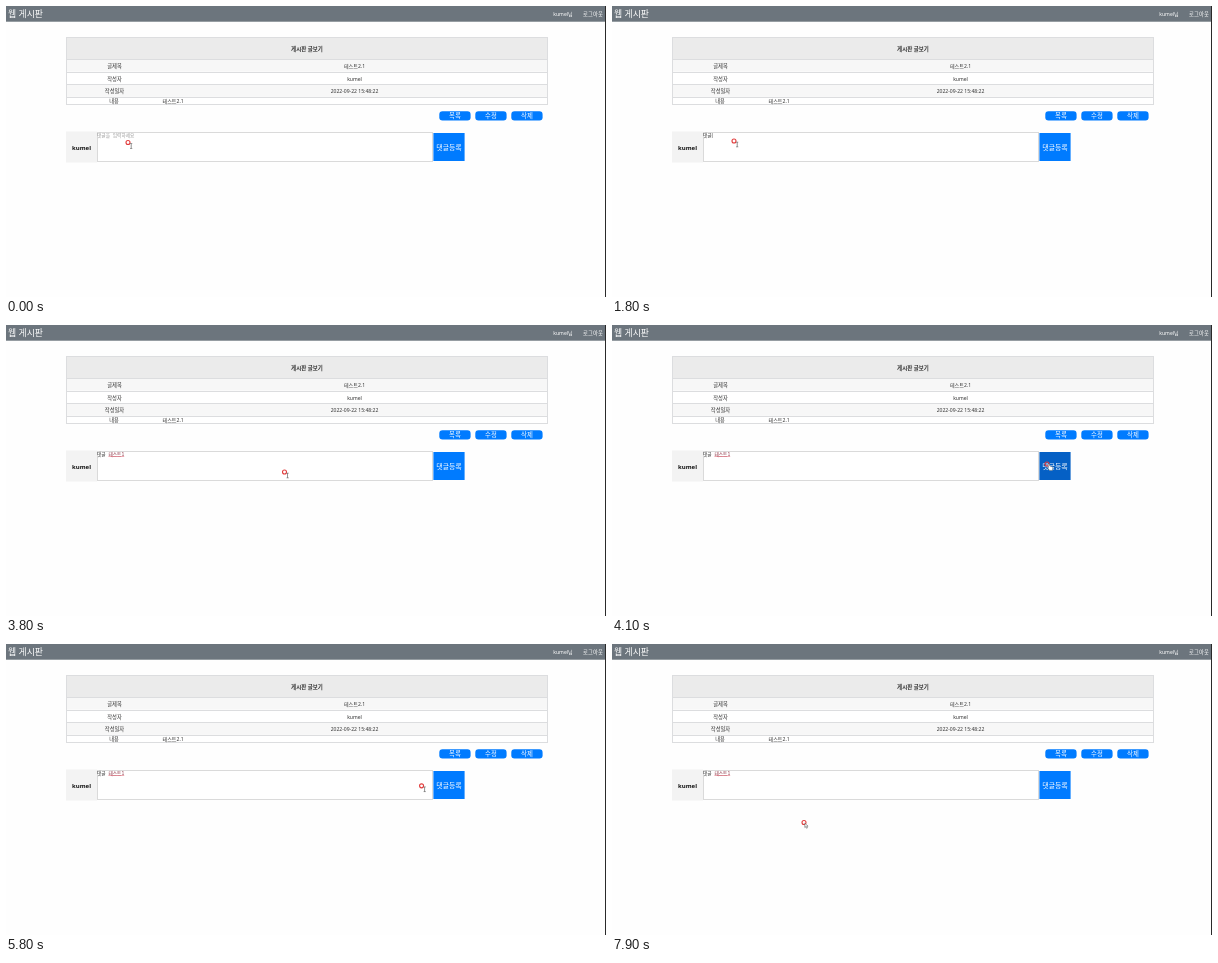
Recreate the animation shown at these times as an HTML page with a canvas. Size 600 px wide and 291 px high, loop 8 s.

```html
<!DOCTYPE html>
<html lang="ko">
<head>
<meta charset="utf-8">
<title>웹 게시판</title>
<style>
  html, body { margin: 0; width: 100%; height: 100%; overflow: hidden; background: #fefefe; }
  canvas { display: block; width: 600px; height: 291px; }
</style>
</head>
<body>
<canvas id="stage"></canvas>
<script>
const canvas = document.getElementById('stage');
const ctx = canvas.getContext('2d');
const ratio = window.devicePixelRatio || 1;
canvas.width = 600 * ratio;
canvas.height = 291 * ratio;

const LOOP = 8000, STEP = 100;
const SANS = '"Noto Sans", "Noto Sans CJK KR", sans-serif';
const MONO = '"Noto Sans Mono", "Noto Sans CJK KR", monospace';
const USER = 'kumel';
const BLUE = '#007bff';
const LEADS = 'ㄱㄲㄴㄷㄸㄹㅁㅂㅃㅅㅆㅇㅈㅉㅊㅋㅌㅍㅎ';

const typing = [
  { at: 1000, gap: 160, word: '댓글 ' },
  { at: 2300, gap: 130, word: '테스트1' }
];
const TYPED = 3600;
const PRESS = 4500;

const moves = [
  { from: 3500, to: 4100, x: 435, y: 139, sag: 10 },
  { from: 5700, to: 6000, x: 360, y: 150, sag: 0 },
  { from: 6200, to: 6600, x: 202, y: 178, sag: 0 },
  { from: 6700, to: 6800, x: 193, y: 175, sag: 0 },
  { from: 7600, to: 7900, x: 192, y: 178.5, sag: 0 }
];

const clamp = v => Math.min(1, Math.max(0, v));
const smooth = k => k * k * (3 - 2 * k);

function ringAt(t) {
  let x = 122, y = 136.5 - 1.5 * clamp(t / 700);
  for (const m of moves) {
    const k = smooth(clamp((t - m.from) / (m.to - m.from)));
    x += (m.x - x) * k;
    y += (m.y - y) * k + m.sag * Math.sin(Math.PI * k);
  }
  return [x, y];
}

// States of a word as its letters are composed key by key
function keystrokes(word) {
  const states = [];
  let done = '';
  for (const ch of word) {
    const code = ch.charCodeAt(0) - 0xac00;
    if (code >= 0) {
      states.push(done + LEADS[Math.floor(code / 588)]);
      if (code % 28) states.push(done + String.fromCharCode(0xac00 + code - code % 28));
    }
    done += ch;
    states.push(done);
  }
  return states;
}

function typedAt(t) {
  return typing.filter(w => t >= w.at).map(w => {
    const states = keystrokes(w.word);
    return states[Math.min(states.length - 1, Math.floor((t - w.at) / w.gap))];
  });
}

function rect(x, y, w, h, color) {
  ctx.fillStyle = color;
  ctx.fillRect(x, y, w, h);
}

function frame(x, y, w, h, color) {
  ctx.strokeStyle = color;
  ctx.lineWidth = 1;
  ctx.strokeRect(x + 0.5, y + 0.5, w - 1, h - 1);
}

// y is the vertical middle of the glyphs
function text(str, x, y, size, { color = '#333', align = 'center', weight = 400, family = SANS } = {}) {
  ctx.font = `${weight} ${size}px ${family}`;
  ctx.textAlign = align;
  ctx.fillStyle = color;
  ctx.fillText(str, x, y + size * 0.36);
  return ctx.measureText(str).width;
}

function shape(points, fill, line) {
  ctx.beginPath();
  points.forEach(([x, y]) => ctx.lineTo(x, y));
  ctx.closePath();
  ctx.fillStyle = fill;
  ctx.fill();
  ctx.strokeStyle = line;
  ctx.lineWidth = 0.5;
  ctx.stroke();
}

function header() {
  const white = { color: '#fff' };
  rect(0, 0, 600, 15.7, '#6c757d');
  text('웹 게시판', 2, 8, 8.9, { color: '#fff', align: 'left' });
  text(USER + '님', 557, 8, 5.1, white);
  text('로그아웃', 587, 8, 5.4, white);
  rect(599, 0, 1, 291, '#2a2a2a');
}

function table() {
  rect(60, 31, 482, 68, '#fff');
  rect(60, 31, 482, 22, '#ebebeb');
  text('게시판 글보기', 301, 43, 5.5, { weight: 700 });
  const rows = [['글제목', '테스트2.1'], ['작성자', USER], ['작성일자', '2022-09-22 15:48:22']];
  rows.forEach(([label, value], i) => {
    const top = 53 + i * 12.6;
    if (i % 2 === 0) rect(60, top, 482, 12.6, '#f7f7f7');
    rect(60, Math.round(top), 482, 1, '#dcdddf');
    text(label, 108.5, top + 7.1, 5.3);
    text(value, 348.5, top + 7.1, 5.05);
  });
  rect(60, 91, 482, 1, '#dcdddf');
  frame(60, 31, 482, 68, '#dcdddf');
  text('내용', 108, 95.2, 5.2);
  text('테스트2.1', 156.5, 95.2, 5.1, { align: 'left' });
}

function buttons() {
  ['목록', '수정', '삭제'].forEach((label, i) => {
    const x = 433.3 + i * 36;
    ctx.beginPath();
    ctx.roundRect(x, 105.2, 31.3, 9.3, 3.2);
    ctx.fillStyle = BLUE;
    ctx.fill();
    text(label, x + 15.7, 110, 6.4, { color: '#fff' });
  });
}

function comment(t, hover) {
  rect(60, 125.5, 31, 31, '#f3f3f3');
  text(USER, 75.5, 141.8, 6, { weight: 700, color: '#111' });
  rect(91, 126, 336, 30, '#fff');
  frame(91, 126, 336, 30, '#dadada');

  const write = (str, x, color) => text(str, x, 129.3, 4.7, { align: 'left', family: MONO, color });
  const words = typedAt(t);
  const checked = t >= TYPED;
  if (!words.length) write('댓글을 입력하세요', 91, '#999');
  let x = 91;
  words.forEach((word, i) => {
    const marked = checked && i === 1;
    const width = write(word, x, marked ? '#8a3040' : '#333');
    if (marked) rect(x, 131.4, width, 0.5, '#d85060');
    x += width;
  });
  if (words.length && !checked) rect(x + 0.3, 127, 0.5, 5, '#555');

  const color = !hover ? BLUE : t < PRESS ? '#0560c5' : '#0a4c94';
  rect(427.4, 127, 31.2, 28, color);
  text('댓글등록', 443, 141.5, 6.9, { color: '#fff' });
}

function pointer(x, y, hover) {
  ctx.beginPath();
  ctx.arc(x, y, 2, 0, Math.PI * 2);
  ctx.strokeStyle = '#e23c3c';
  ctx.lineWidth = 1.1;
  ctx.stroke();
  const inBox = x + 2 > 91 && x + 2 < 427 && y + 2 > 126 && y + 2 < 156;
  ctx.save();
  ctx.translate(x, y);
  if (hover) {
    shape([[1, 0], [2.2, 0], [2.8, 2], [6, 3], [5.4, 6.4], [2.5, 6.4], [0.4, 3.6], [1.5, 3.4]], '#fff', '#567');
  } else if (inBox) {
    rect(2.8, 1, 0.7, 5, '#666');
    rect(2, 0.8, 2.3, 0.6, '#666');
    rect(2, 5.6, 2.3, 0.6, '#666');
  } else {
    shape([[0.8, 0.8], [0.8, 5], [1.8, 4.2], [2.6, 5.8], [3.4, 5.4], [2.7, 3.8], [4.1, 3.7]], '#fff', '#444');
  }
  ctx.restore();
}

function draw(now) {
  const t = Math.floor((now % LOOP) / STEP) * STEP;
  const [x, y] = ringAt(t);
  const hover = x + 2 >= 427 && x + 2 < 459 && y + 2 > 127 && y + 2 < 155;
  ctx.setTransform(ratio, 0, 0, ratio, 0, 0);
  rect(0, 0, 600, 291, '#fefefe');
  header();
  table();
  buttons();
  comment(t, hover);
  pointer(x, y, hover);
}

const start = performance.now();
function tick() {
  draw(performance.now() - start);
  requestAnimationFrame(tick);
}
tick();
</script>
</body>
</html>
```
